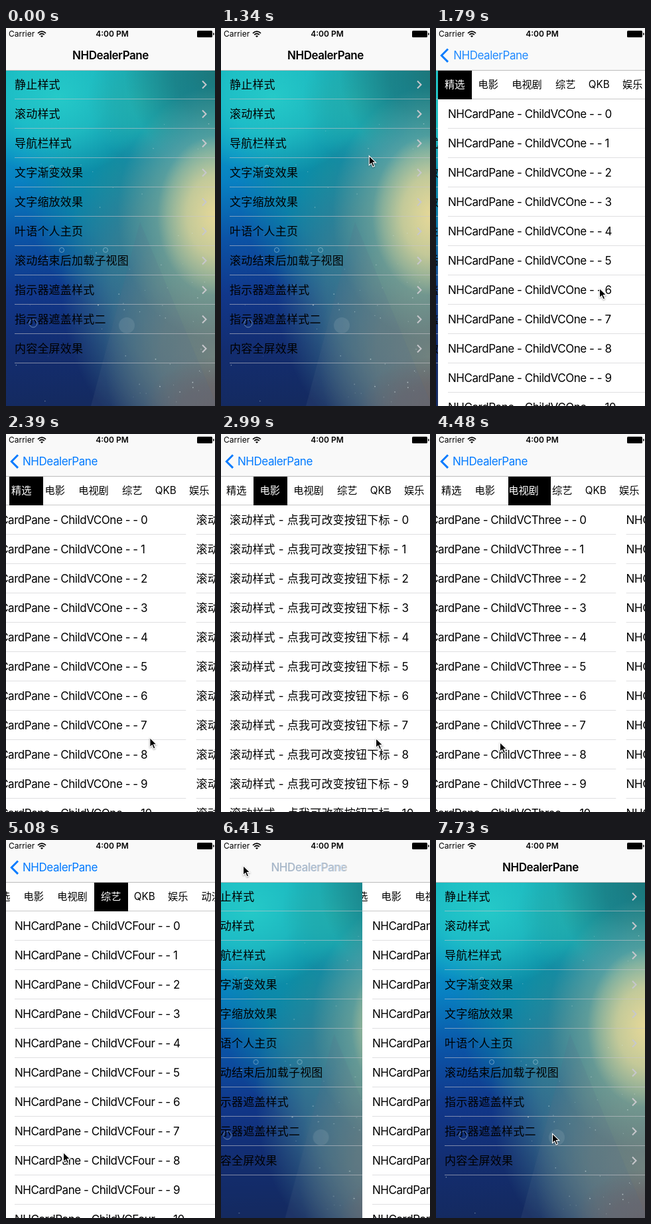
Recreate the animation shown at these times as an HTML page with a canvas. Size 315 by 567 pixels, loop 8 s.

```html
<!DOCTYPE html>
<html lang="zh-CN">
<head>
<meta charset="utf-8">
<title>Paging demo</title>
<style>
html, body { margin: 0; width: 100%; height: 100%; overflow: hidden; background: #fff; }
#stage { position: relative; width: 315px; height: 567px; overflow: hidden; }
/* The 320 x 568 screen is cropped by a thin margin. */
#phone { position: absolute; left: -2px; top: -1px; width: 320px; height: 568px;
  overflow: hidden; color: #000; white-space: nowrap;
  font: 17px/44px Inter, "Noto Sans CJK SC", "Noto Sans CJK", sans-serif; }
#phone div, #phone span, #phone svg, #phone canvas { position: absolute; }
#menu, #detail { left: 0; top: 64px; width: 320px; height: 504px; }
#detail, .page { background: #fff; overflow: hidden; }
.page { left: 0; top: 44px; width: 320px; height: 460px; }
.row { left: 15px; width: 305px; height: 43px; border-bottom: 1px solid #dfdfe1; letter-spacing: -.46px; }
.row.cjk { letter-spacing: .2px; }
#menu .row { border-color: rgba(200, 199, 204, .58); }
.row svg { left: 281px; top: 15px; }
#tabs { left: 0; top: 0; width: 320px; height: 44px; overflow: hidden;
  background: linear-gradient(#fff 43px, #c8c8ca 43px); }
#strip { left: 0; top: 0; font-size: 15.2px; }
#strip span { top: 0; text-align: center; }
#cover { top: 0; height: 44px; background: #000; }
#bar { left: 0; top: 0; width: 320px; height: 64px; background: #f9f9f9; border-bottom: 1px solid rgba(0, 0, 0, .25); }
.status { top: 0; font-size: 12px; line-height: 20px; }
.name { top: 20px; letter-spacing: -.46px; }
#title { font-weight: 600; }
#label { color: #007aff; }
#cursor { position: absolute; left: 0; top: 0; overflow: visible; filter: drop-shadow(0 1px 1px rgba(0, 0, 0, .35)); }
</style>
</head>
<body>
<div id="stage">
  <div id="phone">
    <div id="menu"><canvas id="sky" width="320" height="504"></canvas></div>
    <div id="detail">
      <div id="tabs"><div id="strip"><div id="cover"></div></div></div>
    </div>
    <div id="bar">
      <span class="status" style="left:6px">Carrier</span>
      <svg style="left:49px;top:4px" width="14" height="12" fill="none" stroke="#000" stroke-width="1.7">
        <path d="M1 4.8Q7-.6 13 4.8M3.2 7.2Q7 3.8 10.8 7.2"/>
        <path d="M7 11 4.9 8.9Q7 7.4 9.1 8.9Z" fill="#000" stroke="none"/>
      </svg>
      <span class="status" style="left:0;width:324px;text-align:center;font-weight:600">4:00 PM</span>
      <svg style="left:290px;top:5px" width="27" height="11">
        <rect width="23" height="10" rx="1.5"/><rect x="24" y="3.2" width="1.6" height="3.6" rx=".8"/>
      </svg>
      <svg id="back" style="left:8px;top:31px" width="14" height="23" fill="none" stroke="#007aff" stroke-width="2.9">
        <path d="M12 1.5 2.3 11.2 12 20.9"/>
      </svg>
      <span id="label" class="name">NHDealerPane</span>
      <span id="title" class="name">NHDealerPane</span>
    </div>
  </div>
  <svg id="cursor" width="12" height="18">
    <path d="M.5 .5V14.6L3.8 11.6 6.1 17 8.6 15.9 6.3 10.6H10.8Z" stroke="#fff" stroke-width="1.1"/>
  </svg>
</div>
<script>
const $ = id => document.getElementById(id);

function add(parent, tag, className, text) {
  const el = document.createElement(tag);
  el.className = className;
  el.textContent = text;
  parent.append(el);
  return el;
}

function addRows(parent, texts, cjk) {
  return texts.map((text, i) => {
    const row = add(parent, 'div', cjk ? 'row cjk' : 'row', text);
    row.style.top = i * 44 + 'px';
    return row;
  });
}

const menuItems = ['静止样式', '滚动样式', '导航栏样式', '文字渐变效果', '文字缩放效果', '叶语个人主页',
  '滚动结束后加载子视图', '指示器遮盖样式', '指示器遮盖样式二', '内容全屏效果'];
for (const row of addRows($('menu'), menuItems, true)) {
  row.insertAdjacentHTML('beforeend',
    '<svg width="10" height="14" fill="none" stroke="#c7c7cc" stroke-width="2"><path d="M2 1.5 7.5 7 2 12.5"/></svg>');
}

const prefixes = ['NHCardPane - ChildVCOne - - ', '滚动样式 - 点我可改变按钮下标 - ',
  'NHCardPane - ChildVCThree - - ', 'NHCardPane - ChildVCFour - - '];
const pages = prefixes.map((prefix, i) => {
  const page = add($('detail'), 'div', 'page', '');
  addRows(page, Array.from({ length: 11 }, (_, n) => prefix + n), i === 1);
  return page;
});

let tabEnd = 0;
const tabs = ['精选', '电影', '电视剧', '综艺', 'QKB', '娱乐', '动漫'].map(text => {
  const el = add($('strip'), 'span', '', text);
  const width = text === '电视剧' ? 66 : 50.5;
  const tab = { el, x: tabEnd, width };
  el.style.left = tab.x + 'px';
  el.style.width = width + 'px';
  tabEnd += width;
  return tab;
});

function paintSky() {
  const c = $('sky').getContext('2d');
  const base = c.createLinearGradient(0, 0, 30, 504);
  ['#10aebd', '#0a9fc6', '#0880c2', '#0b53a6', '#11378a', '#132d70', '#142a60']
    .forEach((color, i) => base.addColorStop(i / 6, color));
  c.fillStyle = base;
  c.fillRect(0, 0, 320, 504);

  const disc = (x, y, r) => {
    c.beginPath();
    c.arc(x, y, r, 0, 7);
  };
  const glow = (x, y, rx, ry, color) => {
    c.save();
    c.translate(x, y);
    c.scale(rx, ry);
    const g = c.createRadialGradient(0, 0, 0, 0, 0, 1);
    g.addColorStop(0, color);
    g.addColorStop(.5, color + 'b0');
    g.addColorStop(1, color + '00');
    c.fillStyle = g;
    disc(0, 0, 1);
    c.fill();
    c.restore();
  };
  glow(165, 150, 140, 210, '#0d8ea3');
  glow(80, 40, 140, 120, '#25c9c8');
  glow(205, 45, 80, 90, '#22aeae');
  glow(330, 0, 150, 150, '#1d7477');
  glow(235, 320, 150, 230, '#417f8e');
  glow(320, 430, 170, 210, '#72837f');
  glow(320, 510, 110, 80, '#6b6468');
  glow(320, 215, 150, 190, '#84b39c');
  glow(320, 218, 90, 120, '#e6d898');

  c.fillStyle = 'rgba(80,108,135,.16)';
  c.beginPath();
  c.moveTo(204, 228);
  c.lineTo(130, 504);
  c.lineTo(320, 504);
  c.fill();

  let seed = 7;
  const random = () => (seed = seed * 16807 % 2147483647) / 2147483647;
  for (let i = 0; i < 75; i++) {
    const x = random() * 320, y = 504 * Math.sqrt(random()), size = .6 + random();
    c.fillStyle = `rgba(220,235,235,${.2 + random() * .5})`;
    c.fillRect(x, y, size, size);
  }
  c.strokeStyle = 'rgba(190,220,230,.5)';
  for (const [x, y, r] of [[86, 270, 3.5], [152, 270, 3.5], [43, 380, 6], [71, 146, 3]]) {
    disc(x, y, r);
    c.stroke();
  }
  c.fillStyle = 'rgba(150,175,185,.22)';
  disc(184, 383, 12);
  c.fill();
}
paintSky();

// The screen refreshes in beats, starting when the cursor appears.
const FIRST_BEAT = 890, BEAT = 148.6;

const progress = (beat, start, length) => Math.min(1, Math.max(0, (beat - start) / length));
const easeOut = k => 1 - (1 - k) ** 3;
const smooth = k => k * k * (3 - 2 * k);
const mix = (a, b, k) => a + (b - a) * k;

// Cursor stops: beat, x, y.
const stops = [[0, 262, 8], [2, 215, 125], [6, 246, 390], [9, 268, 455], [14, 233, 456], [20, 195, 456],
  [28, 86, 468], [34, 33, 38], [37, 33, 38], [40, 139, 468], [42, 139, 468], [46, 175, 440]];

function cursorAt(beat) {
  const i = stops.findIndex(stop => stop[0] > beat);
  if (i < 0) return stops[stops.length - 1].slice(1);
  const a = stops[Math.max(0, i - 1)], b = stops[i], k = progress(beat, a[0], b[0] - a[0]);
  return [mix(a[1], b[1], k), mix(a[2], b[2], k)];
}

const moveX = (el, x) => { el.style.transform = `translateX(${x}px)`; };

function draw(time) {
  const beat = Math.floor((time - FIRST_BEAT) / BEAT);
  const away = 1 - easeOut(progress(beat, 3, 4)) + easeOut(progress(beat, 36, 3.22));
  const page = [9, 16, 23].reduce((sum, start) => sum + smooth(progress(beat, start, 4.17)), 0);
  const k = page % 1;

  moveX($('menu'), -96 * (1 - away));
  moveX($('detail'), Math.round(320 * away));
  pages.forEach((el, i) => moveX(el, (i - page) * 320));

  const a = tabs[Math.floor(page)], b = tabs[Math.ceil(page)];
  const coverX = mix(a.x, b.x, k), coverWidth = mix(a.width, b.width, k);
  $('cover').style.left = Math.round(coverX) + 'px';
  $('cover').style.width = Math.round(coverWidth) + 'px';
  $('strip').style.left = -Math.round(Math.max(0, coverX + coverWidth / 2 - 160)) + 'px';
  tabs.forEach((tab, i) => { tab.el.style.color = i === Math.round(page) ? '#fff' : '#000'; });

  const pressed = beat === 35 || beat === 36 ? .3 : 1;
  moveX($('label'), 27 + 75 * away);
  moveX($('title'), 27 + 75 * away);
  $('label').style.opacity = pressed * (1 - Math.sqrt(away));
  $('title').style.opacity = Math.max(0, 2.5 * away - 1.5);
  $('back').style.opacity = pressed * Math.max(0, 1 - 1.6 * away);

  // Each page swipe drags the cursor to the left and back.
  const [x, y] = cursorAt(beat);
  $('cursor').style.transform = `translate(${x - 360 * k * (1 - k)}px, ${y}px)`;
  $('cursor').style.visibility = beat < 0 ? 'hidden' : 'visible';
}

const start = performance.now();
function tick() {
  draw((performance.now() - start) % 8000);
  requestAnimationFrame(tick);
}
tick();
</script>
</body>
</html>
```
